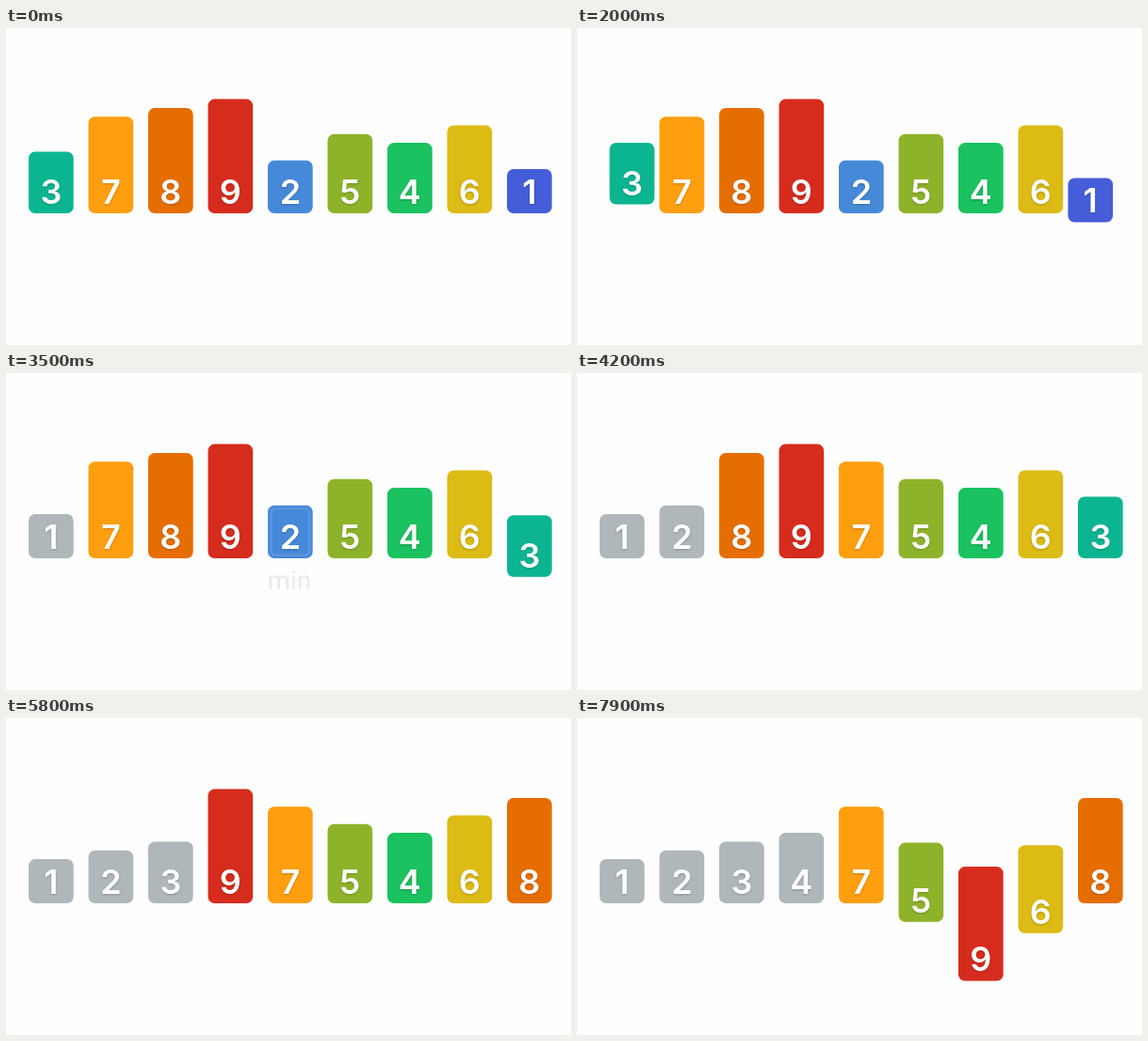
These frames come from a looping animation (600 by 337 pixels, 8 s). An HTML page:

```html
<!DOCTYPE html>
<html lang="en">
<head>
<meta charset="utf-8">
<title>Selection sort</title>
<style>
  html, body { margin: 0; width: 100%; height: 100%; overflow: hidden; background: #fefefe; }
  svg { display: block; width: 100%; height: 100%; }
  .digit { font: 600 36px Inter, "Noto Sans", sans-serif; fill: #fff; text-anchor: middle;
           filter: drop-shadow(0 1px 1px rgba(0,0,0,.22)); }
  .label { font: 28px Roboto, Arial, sans-serif; fill: #5f6569; text-anchor: middle; }
</style>
</head>
<body>
<svg id="stage" viewBox="0 0 600 337"></svg>
<script>
const LOOP = 8000, STEP = 100;      // the picture advances ten times a second
const FLOOR = 197, LEFT = 24, PITCH = 63.5, WIDTH = 47.7;
const DIP = 83, REACH = 1.6, HOP = 33;
const BAR_MS = 100;                 // time the scan needs per bar
const START = [806, 2692, 4450, 6130, 7692];
const VALUES = [3, 7, 8, 9, 2, 5, 4, 6, 1];
const COLORS = ['#455dd9', '#4789d9', '#0cb592', '#1bc260', '#8eb32b',
                '#dcbb14', '#ff9f10', '#e66e00', '#d62c1e'];
const GRAY = [176, 183, 187];

const stage = document.getElementById('stage');
const clamp = v => Math.max(0, Math.min(1, v));
const ramp = (t, from, to) => clamp((t - from) / (to - from));
const slotX = i => LEFT + PITCH * i;

function make(tag, attrs, parent) {
  const el = document.createElementNS('http://www.w3.org/2000/svg', tag);
  set(el, attrs);
  parent.append(el);
  return el;
}
function set(el, attrs) {
  for (const key in attrs) el.setAttribute(key, attrs[key]);
}
function blend(hex, amount) {
  const rgb = GRAY.map((g, i) => {
    const c = parseInt(hex.slice(1 + 2 * i, 3 + 2 * i), 16);
    return Math.round(c + (g - c) * amount);
  });
  return `rgb(${rgb})`;
}

const bars = COLORS.map((color, i) => {
  const value = i + 1, height = 37.7 + 9.3 * value;
  const group = make('g', {}, stage);
  const body = make('rect', { y: -height, width: WIDTH, height, rx: 7 }, group);
  const frame = make('rect', { x: 3.5, y: 3.5 - height, width: WIDTH - 7, height: height - 7,
    rx: 4.5, fill: 'none', stroke: '#fff', 'stroke-width': 2 }, group);
  make('text', { class: 'digit', x: WIDTH / 2, y: -10 }, group).textContent = value;
  return { color, group, body, frame };
});
const label = make('text', { class: 'label', y: 230 }, stage);
label.textContent = 'min';

// One pass per sorted slot: order before the swap and where the minimum lies.
const order = VALUES.slice();
const passes = START.map((start, slot) => {
  const before = order.slice();
  const min = order.indexOf(slot + 1);
  [order[slot], order[min]] = [order[min], order[slot]];
  return { start, slot, min, before };
});

function render(t) {
  let n = 0;
  while (n < passes.length - 1 && t >= passes[n + 1].start - 2 * BAR_MS) n++;
  const { start, slot, min, before } = passes[n];
  const scan = slot + (t - start) / BAR_MS;
  const after = t - start - (8 - slot) * BAR_MS;
  const marked = ramp(after, 100, 165) * (1 - ramp(after, 330, 380));
  const swap = ramp(after, 370, 630);
  const glide = (1 - Math.cos(Math.PI * swap)) / 2;
  const hop = HOP * Math.sin(Math.PI * swap);
  const done = ramp(after, 640, 745);

  before.forEach((value, i) => {
    const bar = bars[value - 1];
    const away = scan - i;
    let x = slotX(i), y = FLOOR;
    if (i >= slot && Math.abs(away) < REACH)
      y += DIP * Math.cos(Math.PI * away / (2 * REACH)) ** 2;
    if (i === slot || i === min) {
      const to = i === slot ? min : slot;
      x += (slotX(to) - x) * glide;
      y += i === slot ? -hop : hop;
    }
    const gray = i < slot ? 1 : i === min ? done : 0;
    set(bar.group, { transform: `translate(${x} ${y})` });
    set(bar.body, { fill: blend(bar.color, gray) });
    set(bar.frame, { opacity: i === min ? marked : 0 });
  });

  // The two travelling bars pass in front of the others.
  stage.append(bars[before[slot] - 1].group, bars[before[min] - 1].group, label);
  set(label, { x: slotX(min) + WIDTH / 2 - 1, opacity: marked });
}

const begin = performance.now();
function tick() {
  const t = Math.max(0, performance.now() - begin) % LOOP;
  render(Math.floor(t / STEP) * STEP);
  requestAnimationFrame(tick);
}
tick();
</script>
</body>
</html>
```
